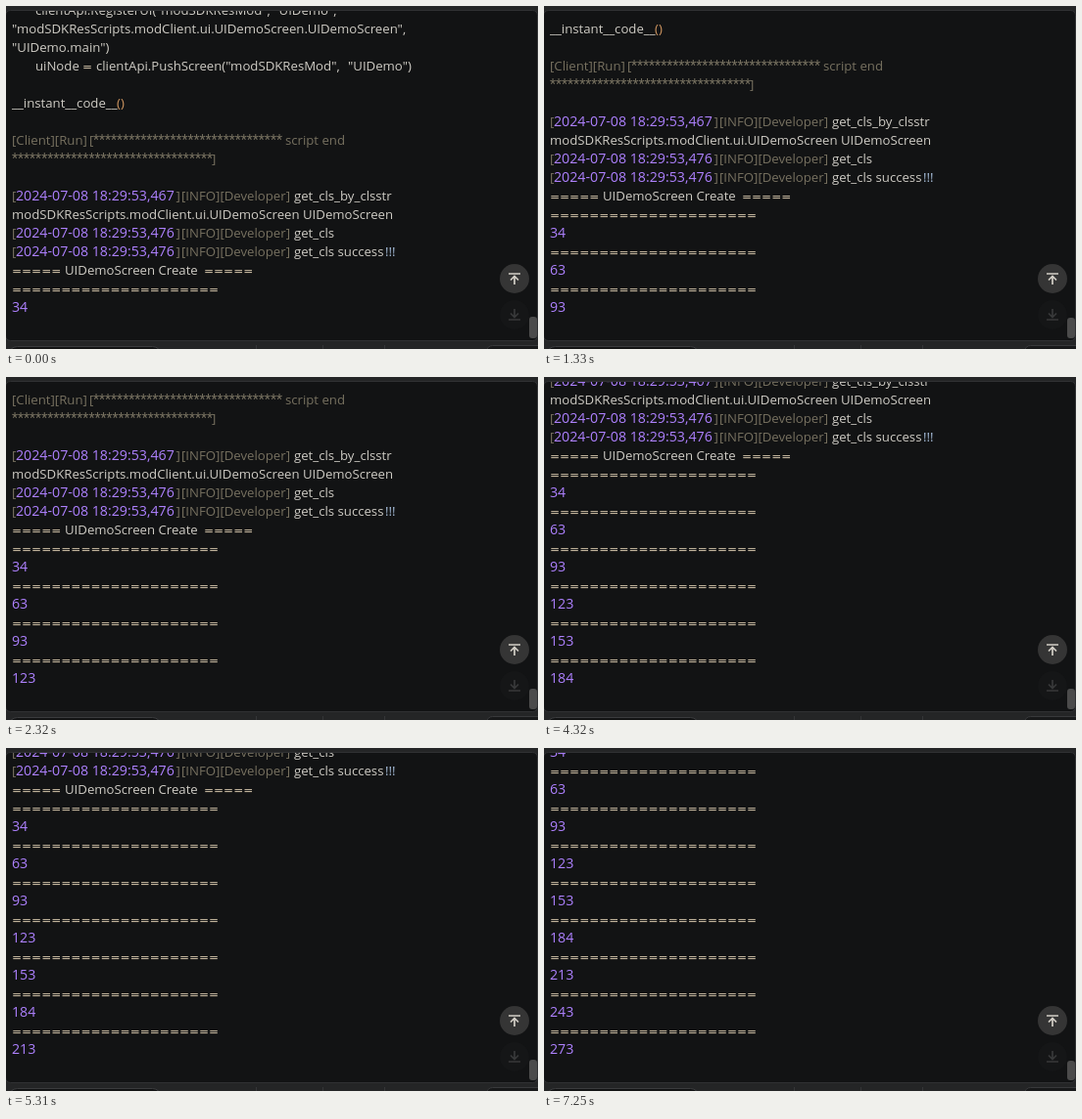
These frames come from a looping animation (543 px wide and 351 px high, 7.85 s). An HTML page with a canvas:

```html
<!DOCTYPE html>
<html lang="en">
<head>
<meta charset="utf-8">
<style>
  html, body { margin: 0; width: 100%; height: 100%; overflow: hidden; background: #242526; }
  canvas { display: block; }
</style>
</head>
<body>
<canvas id="stage" width="543" height="351"></canvas>
<script>
const ctx = document.getElementById('stage').getContext('2d');

const LOOP = 7850;
const STEP_TIMES = [0, 320, 1330, 2320, 3310, 4320, 5310, 6240, 7250];
const COUNTS = [34, 63, 93, 123, 153, 184, 213, 243, 273];
const LINE = 19;
const LAST_BASELINE = 313;

const STYLES = {
  text:  ['13.2px "Open Sans", sans-serif', '#cfccc5'],
  dim:   ['13.2px "Open Sans", sans-serif', '#777160'],
  paren: ['13.2px "Open Sans", sans-serif', '#cf9660'],
  bang:  ['13.2px "Open Sans", sans-serif', '#a9c0dd'],
  num:   ['14.2px "Open Sans", sans-serif', '#ae81ff'],
  rule:  ['12px "DejaVu Sans", sans-serif', '#cdbfa5'],
  star:  ['14px Roboto, sans-serif', '#777160']
};

// A line is a list of spans: [style, x, string].
const text = (s, x = 6) => ['text', x, s];
const dim = (s, x = 6) => ['dim', x, s];
const rule = (n, x = 6) => ['rule', x, '='.repeat(n)];
const log = (ms, ...spans) => [
  dim('['), ['num', 10, '2024-07-08 18:29:53,' + ms], dim(']', 173.5),
  dim('[INFO][Developer]', 179), ...spans
];

const lines = [
  [text('clientApi.RegisterUI("modSDKResMod", "UIDemo",', 30)],
  [text('"modSDKResScripts.modClient.ui.UIDemoScreen.UIDemoScreen",')],
  [text('"UIDemo.main")')],
  [text('uiNode', 30), rule(1, 78), text('clientApi.PushScreen("modSDKResMod",', 92), text('"UIDemo")', 349)],
  [],
  [text('__instant__code__'), ['paren', 113, '()']],
  [],
  [dim('[Client][Run]'), dim('[', 85), ['star', 89, '*'.repeat(32)], dim('script end', 285)],
  [['star', 6, '*'.repeat(34)], dim(']', 210)],
  [],
  log(467, text('get_cls_by_clsstr', 294)),
  [text('modSDKResScripts.modClient.ui.UIDemoScreen'), text('UIDemoScreen', 303)],
  log(476, text('get_cls', 294)),
  log(476, text('get_cls success', 294), ['bang', 387, '!!!']),
  [rule(5), text('UIDemoScreen Create', 60), rule(5, 202)]
];
for (const n of COUNTS) lines.push([rule(21)], [['num', 6, String(n)]]);
const INTRO = lines.length - 2 * COUNTS.length;

function roundBox(x, y, w, h, r, fill, stroke) {
  ctx.beginPath();
  ctx.roundRect(x, y, w, h, r);
  if (fill) { ctx.fillStyle = fill; ctx.fill(); }
  if (stroke) { ctx.strokeStyle = stroke; ctx.lineWidth = 1; ctx.stroke(); }
}

function drawFrame() {
  ctx.fillStyle = '#242526';
  ctx.fillRect(0, 0, 543, 351);
  roundBox(-0.5, 4.5, 543, 338, 5, '#121314', '#303133');
  roundBox(2.5, 348.5, 156, 20, 9, '#121314', '#3a3b3d');
  roundBox(490.5, 347.5, 70, 20, 6, '#18191a', '#38393b');
  ctx.fillStyle = '#353638';
  for (const x of [255, 323, 386]) ctx.fillRect(x, 347, 1, 4);
}

function drawLines(step) {
  const shown = INTRO + 2 * (step + 1);
  ctx.save();
  ctx.beginPath();
  ctx.rect(0, 5, 534, 336);
  ctx.clip();
  for (let i = 0; i < shown; i++) {
    const y = LAST_BASELINE - (shown - 1 - i) * LINE;
    if (y < 0) continue;
    for (const [style, x, s] of lines[i]) {
      [ctx.font, ctx.fillStyle] = STYLES[style];
      ctx.fillText(s, x, y);
    }
  }
  ctx.restore();
}

// Arrow with a bar at its tip; dir is -1 for up and 1 for down.
function drawArrow(cy, dir, color) {
  const at = d => cy + dir * d;
  ctx.strokeStyle = color;
  ctx.lineWidth = 1.7;
  ctx.beginPath();
  ctx.moveTo(513, at(5)); ctx.lineTo(525, at(5));
  ctx.moveTo(519, at(-6)); ctx.lineTo(519, at(2.5));
  ctx.moveTo(515, at(-1.5)); ctx.lineTo(519, at(2.5)); ctx.lineTo(523, at(-1.5));
  ctx.stroke();
}

function drawControls(step) {
  const top = 318 + (step > 0) + (step > 6);
  roundBox(534, top, 8, 340 - top, 3, '#4b4b4b');
  roundBox(504, 264, 30, 30, 15, '#353535');
  drawArrow(279, -1, '#d2cec6');
  roundBox(504, 301, 30, 30, 15, '#151617');
  drawArrow(316, 1, '#38393a');
}

function render(now) {
  const t = now % LOOP;
  const step = STEP_TIMES.filter(s => s <= t).length - 1;
  drawFrame();
  drawLines(step);
  drawControls(step);
}

const start = performance.now();
function tick() {
  render(performance.now() - start);
  requestAnimationFrame(tick);
}
tick();
</script>
</body>
</html>
```
